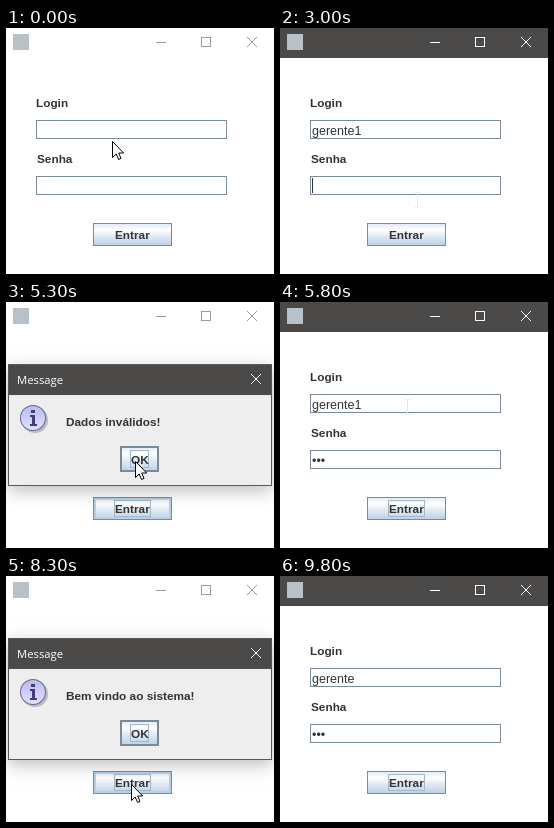
An HTML page with a canvas that plays this animation: 268x246 px, repeating every 10 s.

```html
<!DOCTYPE html>
<html lang="pt">
<head>
<meta charset="utf-8">
<style>
html, body { margin: 0; width: 100%; height: 100%; overflow: hidden; background: #fff; }
canvas { display: block; }
</style>
</head>
<body>
<canvas id="stage" width="268" height="246"></canvas>
<script>
const ctx = document.getElementById('stage').getContext('2d');
const BOLD = 'bold 11.8px "Liberation Sans", Arial, sans-serif';
const PLAIN = '12.5px "Liberation Sans", Arial, sans-serif';
const TITLE = '11.3px "Open Sans", "Noto Sans", sans-serif';
const DARK = '#4c4a48', EDGE = '#7a8a99', PALE = '#b8cfe5', INK = '#333';

// Each step changes part of the state; two steps per half second.
const start = {
  active: false, login: '', pass: '', caret: '', button: '', focus: false,
  dialog: 0, message: '', arrow: [106, 113], beam: null
};
const steps = {
  1: { active: true, caret: 'login', arrow: null },
  2: { arrow: [141, 79] },
  3: { caret: '' },
  4: { login: 'g', caret: 'login' },
  5: { login: 'ger' },
  6: { login: 'gerent' },
  7: { login: 'gerente' },
  8: { login: 'gerente1' },
  10: { caret: '', arrow: null },
  11: { arrow: [141, 111] },
  12: { caret: 'pass', arrow: null, beam: [137, 164] },
  13: { pass: '••', beam: null },
  14: { pass: '•••', arrow: [127, 198] },
  15: { caret: '', button: 'hover', focus: true, arrow: [114, 196] },
  16: { active: false, button: 'pressed' },
  17: { button: 'hover', dialog: 0.5, message: 'Dados inválidos!' },
  18: { dialog: 1 },
  19: { arrow: [139, 178] },
  20: { arrow: [129, 159] },
  22: { active: true, button: '', dialog: 0.4, arrow: null },
  23: { dialog: 0, beam: [127, 97] },
  25: { caret: 'login', focus: false, beam: null },
  27: { caret: '' },
  28: { arrow: [137, 192] },
  29: { login: 'gerente', caret: 'login' },
  30: { button: 'hover', arrow: [130, 214] },
  31: { active: false, caret: '', button: 'pressed', focus: true, arrow: [125, 208] },
  32: { button: 'hover', dialog: 0.5, message: 'Bem vindo ao sistema!' },
  33: { dialog: 1 },
  34: { arrow: [147, 205] },
  35: { arrow: [90, 118] },
  36: { arrow: [129, 157] },
  37: { active: true, button: '', dialog: 0.4, arrow: null },
  38: { dialog: 0.03 },
  39: { dialog: 0 }
};

function rect(x, y, w, h, color) {
  ctx.fillStyle = color;
  ctx.fillRect(x, y, w, h);
}

function frame(x, y, w, h, color, width = 1) {
  ctx.strokeStyle = color;
  ctx.lineWidth = width;
  ctx.strokeRect(x + width / 2, y + width / 2, w - width, h - width);
}

function text(str, x, y, font, color = INK) {
  ctx.font = font;
  ctx.fillStyle = color;
  ctx.fillText(str, x, y);
}

function cross(x, y, color) {
  ctx.strokeStyle = color;
  ctx.lineWidth = 1;
  ctx.beginPath();
  ctx.moveTo(x, y);
  ctx.lineTo(x + 10, y + 10);
  ctx.moveTo(x + 10, y);
  ctx.lineTo(x, y + 10);
  ctx.stroke();
}

function titleBar(active) {
  const color = active ? '#fff' : '#999';
  rect(0, 0, 268, 30, active ? DARK : '#fff');
  rect(7, 6, 16, 16, '#b8c0c8');
  rect(150, 14, 10, 1, color);
  frame(195, 9, 10, 10, color);
  cross(241, 9, color);
}

function field(y, value, caret) {
  frame(30, y, 191, 19, EDGE);
  text(value, 32, y + 15, PLAIN);
  if (caret) rect(32 + Math.round(ctx.measureText(value).width), y + 2, 1, 15, INK);
}

function buttonFace(x, y, w, h) {
  const g = ctx.createLinearGradient(0, y, 0, y + h);
  g.addColorStop(0, '#dde8f3');
  g.addColorStop(0.3, '#fff');
  g.addColorStop(0.6, '#dde8f3');
  g.addColorStop(1, PALE);
  rect(x, y, w, h, g);
}

function enterButton({ button, focus }) {
  const pressed = button === 'pressed';
  if (pressed) rect(87, 195, 79, 23, PALE);
  else buttonFace(87, 195, 79, 23);
  if (button === 'hover') frame(88, 196, 77, 21, PALE, 2);
  frame(87, 195, 79, 23, EDGE);
  if (pressed) {
    rect(88, 196, 77, 1, EDGE);
    rect(88, 196, 1, 21, EDGE);
  }
  if (focus) frame(108, 198, 37, 17, pressed ? '#8fa9c4' : '#a3b8cc');
  text('Entrar', 109, 211, BOLD);
}

function infoIcon(x, y) {
  const disc = (dx, r, fill) => {
    ctx.fillStyle = fill;
    ctx.beginPath();
    ctx.arc(x + dx, y + dx, r, 0, 7);
    ctx.fill();
  };
  const g = ctx.createLinearGradient(0, y - 13, 0, y + 13);
  g.addColorStop(0, '#b9b9f2');
  g.addColorStop(1, '#e2e2ff');
  disc(2, 13, '#bbb');
  disc(0, 13, '#66669c');
  disc(0, 12, g);
  const ink = '#3f3f75';
  rect(x - 2, y - 8, 4, 3, ink);
  rect(x - 3, y - 3, 5, 2, ink);
  rect(x - 1, y - 3, 3, 10, ink);
  rect(x - 3, y + 6, 7, 2, ink);
}

function dialogBox({ dialog, message }) {
  if (!dialog) return;
  ctx.save();
  ctx.globalAlpha = dialog;
  ctx.shadowColor = 'rgba(0,0,0,.25)';
  ctx.shadowBlur = 16;
  ctx.shadowOffsetY = 5;
  rect(2, 62, 264, 122, '#eee');
  ctx.shadowColor = 'transparent';
  rect(2, 62, 264, 31, DARK);
  frame(2, 62, 264, 122, '#5a5856');
  text('Message', 11, 82, TITLE, '#fff');
  cross(245, 72, '#fff');
  infoIcon(27, 116);
  text(message, 60, 124, BOLD);
  buttonFace(114, 144, 39, 26);
  frame(114, 144, 39, 26, EDGE, 2);
  frame(124, 148, 19, 18, '#a3b8cc');
  text('OK', 125, 162, BOLD);
  ctx.restore();
}

const arrowShape = new Path2D('M.5 .5V16.5L4.2 13L6.6 18.5L9 17.4L6.7 12H11.7Z');

function pointer({ arrow, beam }) {
  if (arrow) {
    ctx.save();
    ctx.translate(...arrow);
    ctx.fillStyle = '#fff';
    ctx.strokeStyle = '#000';
    ctx.lineWidth = 1;
    ctx.fill(arrowShape);
    ctx.stroke(arrowShape);
    ctx.restore();
  }
  if (beam) {
    const [x, y] = beam;
    rect(x, y + 1, 1, 14, '#e6e6e6');
    rect(x - 3, y, 7, 1, '#f0f0f0');
    rect(x - 3, y + 15, 7, 1, '#f0f0f0');
  }
}

function stateAt(ms) {
  const now = Math.floor(ms / 500) * 2 + (ms % 500 >= 300 ? 1 : 0);
  const state = { ...start };
  for (let i = 1; i <= now; i++) Object.assign(state, steps[i]);
  return state;
}

function draw() {
  const s = stateAt(performance.now() % 10000);
  rect(0, 0, 268, 246, '#fff');
  titleBar(s.active);
  text('Login', 30, 79, BOLD);
  field(92, s.login, s.caret === 'login');
  text('Senha', 31, 135, BOLD);
  field(148, s.pass, s.caret === 'pass');
  enterButton(s);
  dialogBox(s);
  pointer(s);
  requestAnimationFrame(draw);
}
draw();
</script>
</body>
</html>
```
